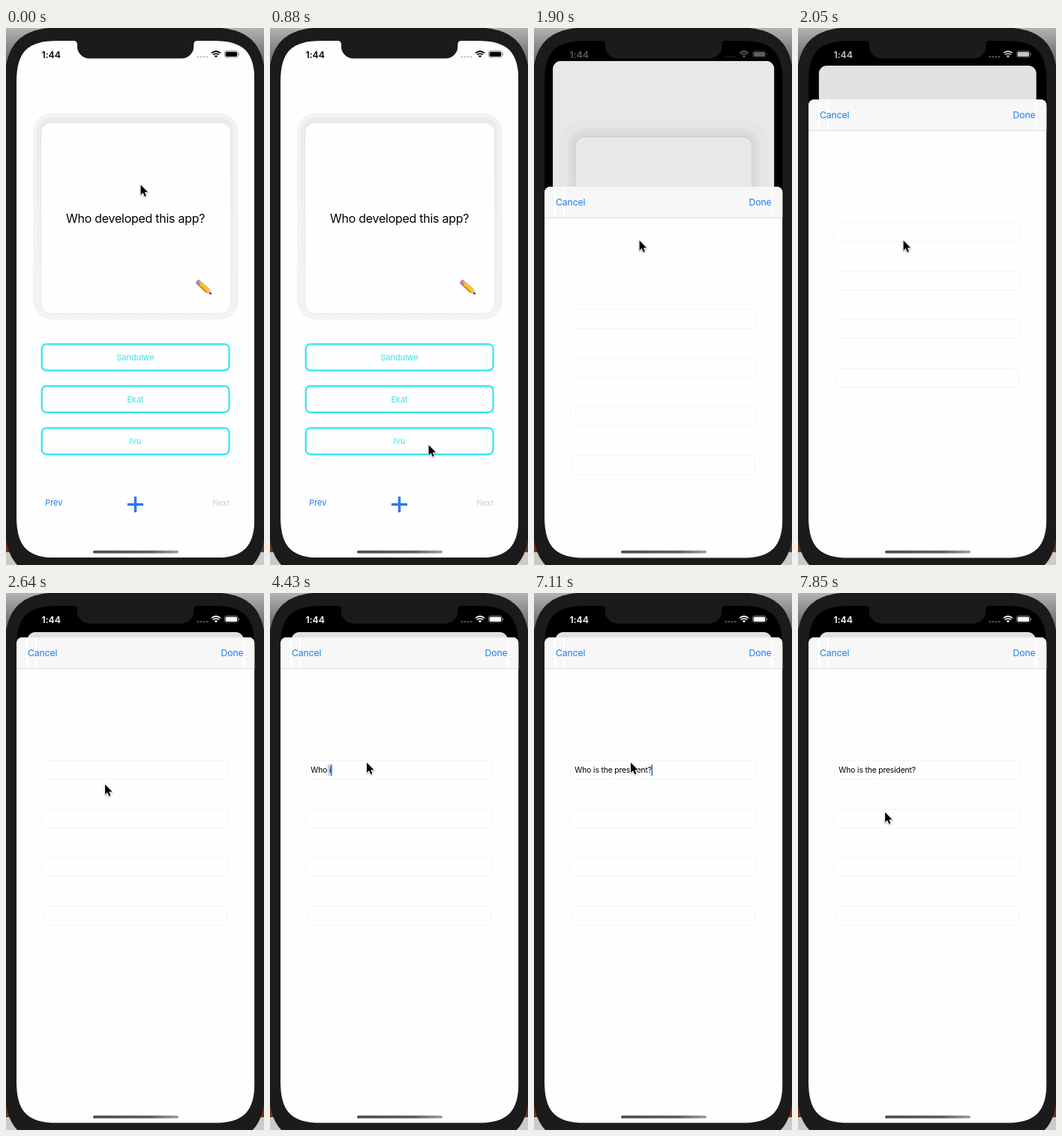
Recreate the animation shown at these times as an HTML page with a canvas. Size 344 by 714 pixels, loop 7990 ms.

```html
<!DOCTYPE html>
<html lang="en">
<head>
<meta charset="utf-8">
<title>Quiz cards</title>
<style>
html, body { margin: 0; width: 100%; height: 100%; overflow: hidden; background: #1b1b1b; }
canvas { display: block; width: 344px; height: 714px; }
</style>
</head>
<body>
<canvas id="stage"></canvas>
<script>
const W = 344, H = 714, LOOP = 7990;
const BODY = '#1b1b1b', BLUE = '#1f7cf6', CYAN = '#35e6ef';
const SCREEN = { x: 14, y: 17, w: 317.5, h: 687.5 };
const CENTER = SCREEN.x + SCREEN.w / 2;
const SHEET_TOP = 59;

const canvas = document.getElementById('stage');
const ctx = canvas.getContext('2d');
const dpr = window.devicePixelRatio || 1;
canvas.width = W * dpr;
canvas.height = H * dpr;

// Held keys: [time, value...]
const pointer = [
  [0, 180, 208], [150, 190, 173], [300, 181, 390], [440, 168, 618],
  [730, 186, 597], [880, 212, 554], [1020, 226, 588], [1170, 214, 640],
  [1310, 192, 647], [1460, 179, 636], [1600, 172, 627], [1750, 171, 625],
  [1900, 141, 282], [2640, 132.5, 254], [2790, 130.5, 238], [2940, 129.5, 225],
  [7550, 127, 238], [7700, 119, 274], [7850, 116.5, 291]
];
const present = [[0, 0], [1900, 0.765], [2050, 0.945], [2200, 0.988], [2350, 1]];
const typing = [
  [0, 0], [3830, 2], [3980, 3], [4280, 4], [4430, 5], [4580, 6], [4730, 8],
  [4870, 10], [5020, 11], [5470, 12], [5760, 14], [6060, 15], [6210, 18],
  [6360, 19], [6660, 20], [7110, 21]
];
const QUESTION = 'Who is the president?';

function held(keys, t) {
  let current = keys[0];
  for (const key of keys) if (key[0] <= t) current = key;
  return current;
}

function roundRect(x, y, w, h, r) {
  ctx.beginPath();
  ctx.roundRect(x, y, w, h, r);
}

// Rectangle whose corners ease into the sides.
function smoothRect(x, y, w, h, r) {
  const e = r * 1.3, c = r * 0.35, right = x + w, bottom = y + h;
  ctx.beginPath();
  ctx.moveTo(x + e, y);
  ctx.lineTo(right - e, y);
  ctx.bezierCurveTo(right - c, y, right, y + c, right, y + e);
  ctx.lineTo(right, bottom - e);
  ctx.bezierCurveTo(right, bottom - c, right - c, bottom, right - e, bottom);
  ctx.lineTo(x + e, bottom);
  ctx.bezierCurveTo(x + c, bottom, x, bottom - c, x, bottom - e);
  ctx.lineTo(x, y + e);
  ctx.bezierCurveTo(x, y + c, x + c, y, x + e, y);
  ctx.closePath();
}

function fillRound(x, y, w, h, r, color) {
  roundRect(x, y, w, h, r);
  ctx.fillStyle = color;
  ctx.fill();
}

function strokeRound(x, y, w, h, r, color, width) {
  roundRect(x, y, w, h, r);
  ctx.strokeStyle = color;
  ctx.lineWidth = width;
  ctx.stroke();
}

function setFont(size, weight = 400, spacing = 0) {
  ctx.font = `${weight} ${size}px Inter, "Open Sans", sans-serif`;
  ctx.letterSpacing = spacing + 'px';
}

function text(str, x, y, color, align = 'left') {
  ctx.fillStyle = color;
  ctx.textAlign = align;
  ctx.fillText(str, x, y);
}

function gradient(x0, y0, x1, y1, ...stops) {
  const g = ctx.createLinearGradient(x0, y0, x1, y1);
  stops.forEach((c, i) => g.addColorStop(i / (stops.length - 1), c));
  return g;
}

function drawBody() {
  ctx.fillStyle = gradient(0, 0, 0, 46, '#b2b2b2', '#686868');
  ctx.fillRect(0, 0, W, H);
  ctx.fillStyle = '#6d3518';
  ctx.fillRect(0, 640, W, 57);
  ctx.fillStyle = '#cbcbcb';
  ctx.fillRect(0, 697, W, 17);
  smoothRect(-2, -1, 348, 733, 60);
  ctx.fillStyle = BODY;
  ctx.fill();
}

function triangle(x, half, tip, color) {
  ctx.beginPath();
  ctx.moveTo(x, -half);
  ctx.lineTo(tip, 0);
  ctx.lineTo(x, half);
  ctx.fillStyle = color;
  ctx.fill();
}

function drawPencil() {
  ctx.save();
  ctx.translate(264, 345);
  ctx.rotate(0.74);
  fillRound(-13, -3.4, 5, 6.8, 2, '#d9808a');
  ctx.fillStyle = gradient(0, -3.4, 0, 3.4, '#c9cccf', '#777b80');
  ctx.fillRect(-9.5, -3.4, 3, 6.8);
  ctx.fillStyle = gradient(0, -3.4, 0, 3.4, '#e3a81f', '#fbd040', '#f2b01f', '#b8780f');
  ctx.fillRect(-6.5, -3.4, 14, 6.8);
  triangle(7.5, 3.4, 13.5, '#e3bd88');
  triangle(10.6, 1.7, 13.8, '#2a2623');
  ctx.restore();
}

function drawCard(p) {
  fillRound(24, 100, 298, 300, 36, `rgba(0,0,0,${0.02 * p})`);
  fillRound(36, 113, 274, 275, 26, '#f3f3f3');
  fillRound(41, 119, 264, 264, 20, gradient(0, 119, 0, 383, '#ececec', '#f0f0f0', '#f3f3f3'));
  fillRound(46, 124.8, 254, 255, 14, gradient(0, 124, 0, 381, '#e0e0e0', '#e9e9e9', '#e8e8e8'));
  fillRound(47, 126, 252, 253, 13, '#fefefe');
  setFont(16, 400, -0.27);
  text('Who developed this app?', 172.6, 258.5, '#000', 'center');
  drawPencil();
}

function drawHome(p, pressed) {
  const scale = 1 - 0.091 * p;
  ctx.save();
  ctx.translate(CENTER, SCREEN.y + 35 * p);
  ctx.scale(scale, scale);
  ctx.translate(-CENTER, -SCREEN.y);
  roundRect(SCREEN.x, SCREEN.y, SCREEN.w, SCREEN.h, p ? [12, 12, 0, 0] : 0);
  ctx.clip();
  ctx.fillStyle = '#fefefe';
  ctx.fillRect(SCREEN.x, SCREEN.y, SCREEN.w, SCREEN.h);

  drawCard(p);
  setFont(11, 400, -0.08);
  ['Sandulwe', 'Ekat', 'Ivu'].forEach((name, i) => {
    const y = 420.4 + i * 55.7;
    strokeRound(47.7, y, 249.8, 35, 6, CYAN, 2.2);
    text(name, 172.5, y + 21.4, CYAN, 'center');
  });
  text('Prev', 52.3, 634.5, BLUE);
  setFont(10.7, 400, -0.08);
  text('Next', 298.5, 634.5, '#cfcfcf', 'right');

  ctx.fillStyle = pressed ? '#86b5f5' : '#2a7af5';
  ctx.fillRect(162, 631.8, 21, 3.4);
  ctx.fillRect(170.8, 623, 3.4, 21);

  ctx.fillStyle = `rgba(0,0,0,${0.115 * p})`;
  ctx.fillRect(SCREEN.x, SCREEN.y, SCREEN.w, SCREEN.h);
  ctx.restore();
}

function drawField(t) {
  const x = 54.3, base = 180;
  const count = held(typing, t)[1];
  const typed = QUESTION.slice(0, count);
  setFont(10.3, 400, -0.14);
  const widthOf = n => ctx.measureText(QUESTION.slice(0, n)).width;
  const end = x + widthOf(count);
  const word = { 5: 3, 15: 10 }[count];
  if (word) {
    const start = x + widthOf(word) + 0.5;
    ctx.fillStyle = '#c3d8f4';
    ctx.fillRect(start, 169, end - start + 0.5, 15);
  }
  text(typed, x, base, '#000');
  if (t >= 3230 && t < 7700) {
    ctx.fillStyle = '#3c6fce';
    ctx.fillRect(end - 0.3, 169, 1.6, 15);
  }
}

function drawSheet(p, t) {
  const bottom = 705;
  ctx.save();
  ctx.translate(0, Math.round(bottom + (SHEET_TOP - bottom) * p));
  roundRect(SCREEN.x, 0, SCREEN.w, 700, [8, 8, 0, 0]);
  ctx.clip();
  ctx.fillStyle = '#fefefe';
  ctx.fillRect(14, 0, 318, 700);
  ctx.fillStyle = '#f7f7f7';
  ctx.fillRect(14, 0, 318, 41);
  ctx.fillStyle = '#fff';
  for (const x of [27, 39, 316]) ctx.fillRect(x, 1, 2, 40);
  ctx.fillStyle = '#dfdfdf';
  ctx.fillRect(14, 41, 318, 1);

  setFont(12.3, 400, -0.15);
  text('Cancel', 29, 25, BLUE);
  text('Done', 316.6, 25, BLUE, 'right');

  for (let i = 0; i < 4; i++) {
    const inset = i === 3 ? 3 : 0;
    strokeRound(48.5 + inset, Math.round(163 + i * 64.6) + 0.5, 248 - inset * 1.67, 25, 4, '#f4f4f4', 1);
  }
  drawField(t);
  ctx.restore();
}

function drawStatus(p) {
  const ink = p === 0 ? '#000' : p < 0.9 ? '#5e5e5e' : p < 0.97 ? '#c4c4c4' : '#fff';
  setFont(12.4, 600, -0.1);
  text('1:44', 47.6, 39.5, ink);

  ctx.fillStyle = p === 0 ? '#c6c6c6' : p < 0.9 ? '#1c1c1c' : '#555';
  for (let i = 0; i < 4; i++) {
    ctx.beginPath();
    ctx.arc(256 + i * 4, 38.2, 1.3, 0, 7);
    ctx.fill();
  }

  const mid = -Math.PI / 2, spread = 0.76;
  ctx.strokeStyle = ctx.fillStyle = ink;
  ctx.lineWidth = 1.9;
  for (const r of [5.2, 8.3]) {
    ctx.beginPath();
    ctx.arc(280, 39.3, r, mid - spread, mid + spread);
    ctx.stroke();
  }
  ctx.beginPath();
  ctx.moveTo(280, 39.6);
  ctx.arc(280, 39.3, 2.9, mid - spread, mid + spread);
  ctx.fill();

  ctx.globalAlpha = 0.45;
  strokeRound(291.5, 30.5, 17.8, 8.6, 2.4, ink, 0.9);
  fillRound(310, 33.3, 1.2, 3, 0.6, ink);
  ctx.globalAlpha = 1;
  fillRound(292.7, 31.7, 15.4, 6.2, 1.4, ink);
}

function drawNotch() {
  const left = 95, right = 250.3, bottom = 40.4;
  ctx.beginPath();
  ctx.moveTo(left - 5, 16);
  ctx.lineTo(left - 5, 17);
  ctx.quadraticCurveTo(left, 17, left, 22);
  ctx.arcTo(left, bottom, left + 16, bottom, 16);
  ctx.arcTo(right, bottom, right, bottom - 16, 16);
  ctx.lineTo(right, 22);
  ctx.quadraticCurveTo(right, 17, right + 5, 17);
  ctx.lineTo(right + 5, 16);
  ctx.fillStyle = BODY;
  ctx.fill();
}

function drawPointer(x, y) {
  const arrow = new Path2D('M0 0V14.6L3.3 11.5L5.6 16.9L8 15.9L5.7 10.6H10.4Z');
  ctx.save();
  ctx.translate(x - 0.4, y + 0.5);
  ctx.scale(0.92, 0.92);
  ctx.shadowColor = 'rgba(0,0,0,.3)';
  ctx.shadowBlur = 2 * dpr;
  ctx.shadowOffsetY = dpr;
  ctx.strokeStyle = '#fff';
  ctx.lineWidth = 2;
  ctx.lineJoin = 'round';
  ctx.stroke(arrow);
  ctx.shadowColor = 'transparent';
  ctx.fillStyle = '#000';
  ctx.fill(arrow);
  ctx.restore();
}

function draw(t) {
  const p = held(present, t)[1];
  const [, px, py] = held(pointer, t);
  ctx.setTransform(dpr, 0, 0, dpr, 0, 0);
  drawBody();

  ctx.save();
  smoothRect(SCREEN.x, SCREEN.y, SCREEN.w, SCREEN.h, 42);
  ctx.clip();
  ctx.fillStyle = '#000';
  ctx.fillRect(0, 0, W, H);
  drawHome(p, t >= 1750);
  if (p > 0) drawSheet(p, t);
  drawStatus(p);
  ctx.restore();

  drawNotch();
  fillRound(116, 694.8, 114, 3.8, 1.9, gradient(116, 0, 230, 0, '#4c4c4c', '#555', '#5e5e5e', '#a0a0a0'));
  drawPointer(px, py);
}

const start = performance.now();
function tick() {
  draw((performance.now() - start) % LOOP);
  requestAnimationFrame(tick);
}
tick();
</script>
</body>
</html>
```
